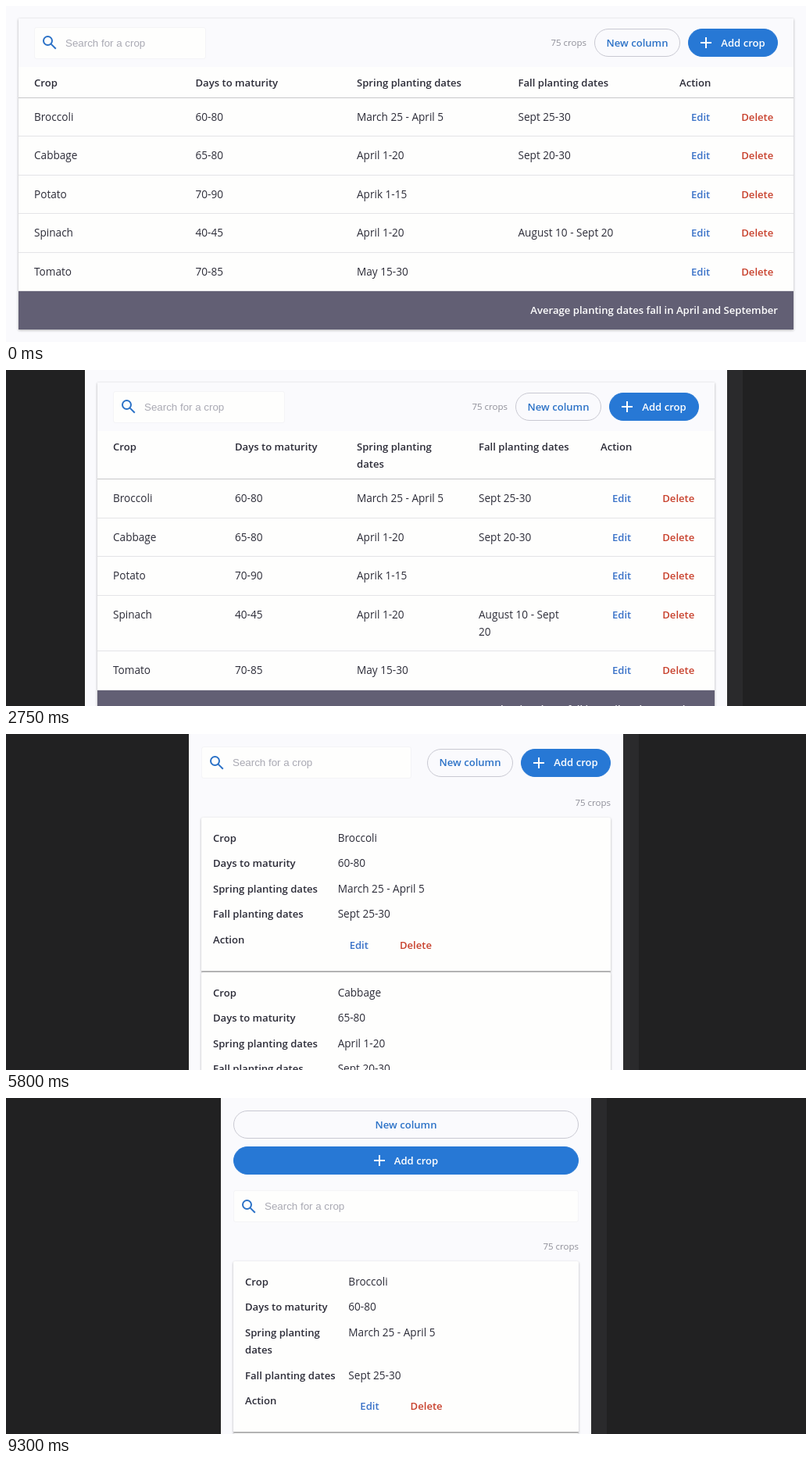
An HTML page for the animation above (9.4 s loop, 1024 by 430 pixels).

```html
<!DOCTYPE html>
<html lang="en">
<head>
<meta charset="utf-8">
<title>Responsive crop table</title>
<style>
@property --x { syntax: "<integer>"; inherits: true; initial-value: 0; }
@property --lag { syntax: "<integer>"; inherits: true; initial-value: 0; }

/* --x is the inset of the viewport on both sides while it is dragged narrower */
@keyframes drag {
  0%, 8.511% { --x: 0; }
  14.362% { --x: 20; }
  18.085% { --x: 30; }
  28.191% { --x: 96; }
  29.255% { --x: 101; }
  36.17% { --x: 164; }
  38.298% { --x: 181; }
  47.34%, 52.128% { --x: 202; }
  59.574% { --x: 229; }
  70.213% { --x: 254; }
  79.787% { --x: 274; }
  81.915%, 100% { --x: 275; }
}
/* the layout trails the viewport for a moment */
@keyframes trail {
  0%, 11.7% { --lag: 0; }
  14.362% { --lag: 10; }
  17%, 100% { --lag: 0; }
}

* { box-sizing: border-box; }
html, body {
  margin: 0;
  width: 100%;
  height: 100%;
  overflow: hidden;
  background: #212122;
}
.page {
  position: absolute;
  top: 0;
  left: calc(var(--x) * 1px);
  width: calc(1024px - var(--x) * 2px);
  height: 430px;
  overflow: hidden;
  container-type: inline-size;
  background: #fafafd;
  box-shadow: 20px 0 #2a2a2c;
  color: #2c2c38;
  font: 13.6px/22.4px "Open Sans", "Noto Sans", sans-serif;
  animation: drag 9.4s linear infinite, trail 9.4s linear infinite;
}
.app {
  width: calc(100% - 32px + var(--lag) * 1px);
  margin: 16px;
  box-shadow: 0 1px 3px rgba(0, 0, 0, .3);
}
svg { fill: none; stroke: currentColor; stroke-width: 2; flex: none; }

.bar {
  display: flex;
  align-items: center;
  gap: 0 10px;
  height: 62px;
  padding: 0 20px;
}
.search {
  display: flex;
  align-items: center;
  gap: 8px;
  width: 220px;
  height: 41px;
  padding-left: 7px;
  border: 1px solid #f4f4f7;
  border-radius: 3px;
  background: #fefefd;
  color: #a9a9b3;
  font: 13.333px "Liberation Sans", Arial, sans-serif;
}
.search svg { color: #2c72c7; }
.count { margin-left: auto; color: #8e8e98; font-size: 11.5px; }
.btn {
  display: flex;
  align-items: center;
  justify-content: center;
  gap: 12px;
  width: 110px;
  height: 36px;
  border: 1px solid #c9c9d2;
  border-radius: 18px;
  color: #2c72c7;
  white-space: nowrap;
}
.add { width: 115px; border-color: #2778d5; background: #2778d5; color: #fff; }
.btn, .head, .label, .acts, footer { font-weight: 600; font-size: 13.1px; }

.row {
  display: grid;
  grid-template-columns: repeat(4, minmax(0, 1fr)) 166px;
  padding: 13px 0;
  border-bottom: 1px solid #e4e4e7;
  background: #fefefd;
}
.head { padding: 8.6px 0 8px; border-color: #c8c8ca; }
.cell { padding: 0 16px 0 20px; }
.label { display: none; }
.acts { display: flex; gap: 10px; }
.acts span { padding: 0 15px; }
.edit { color: #3a72c8; }
.delete { color: #c8412d; }
footer {
  padding: 0 20px;
  background: #625f74;
  color: #fff;
  line-height: 49px;
  text-align: right;
  white-space: nowrap;
}

@container (max-width: 768px) {
  .app { box-shadow: none; }
  .bar { flex-wrap: wrap; height: auto; padding: 0; }
  .search { flex: 1 1 0; margin-right: 10px; }
  .count { order: 4; flex: 0 0 100%; margin: 20px 0 7.6px; text-align: right; }
  .head { display: none; }
  .row:not(.head) {
    display: block;
    padding: 15px 0;
    border-bottom: 2px solid #b8b8b9;
    border-radius: 2px;
    box-shadow: 0 1px 3px rgba(0, 0, 0, .3);
  }
  .cell { display: grid; grid-template-columns: 33.333% 1fr; padding: 0; margin-bottom: 10px; }
  .cell:last-child { margin: 0; }
  .label { display: block; padding: 0 14px 0 15px; }
  .acts { line-height: 36.4px; }
}
@container (max-width: 500px) {
  .btn, .search { flex: 0 0 100%; }
  .add { order: 1; margin-top: 10px; }
  .search { order: 2; margin: 20px 0 0; }
}
</style>
</head>
<body>
<main class="page">
  <section class="app">
    <div class="bar">
      <div class="search">
        <svg width="24" height="24"><circle cx="9.5" cy="9.5" r="5.5"/><path d="M13.6 13.6 19.8 19.8"/></svg>
        <span>Search for a crop</span>
      </div>
      <div class="count">75 crops</div>
      <div class="btn">New column</div>
      <div class="btn add"><svg width="14" height="14"><path d="M7 0V14M0 7H14"/></svg>Add crop</div>
    </div>
    <div id="table"></div>
    <footer>Average planting dates fall in April and September</footer>
  </section>
</main>
<script>
const labels = ["Crop", "Days to maturity", "Spring&nbsp;planting dates", "Fall&nbsp;planting&nbsp;dates", "Action"];
const crops = [
  ["Broccoli", "60-80", "March 25 - April 5", "Sept 25-30"],
  ["Cabbage", "65-80", "April 1-20", "Sept 20-30"],
  ["Potato", "70-90", "Aprik 1-15", ""],
  ["Spinach", "40-45", "April 1-20", "August 10 - Sept 20"],
  ["Tomato", "70-85", "May 15-30", ""]
];
const acts = '<div class="acts"><span class="edit">Edit</span><span class="delete">Delete</span></div>';
const cell = html => `<div class="cell">${html}</div>`;
const row = (cells, type = "") => `<div class="row ${type}">${cells.map(cell).join("")}</div>`;
const field = (value, i) => `<div class="label">${labels[i]}</div><div>${value}</div>`;

document.getElementById("table").innerHTML =
  row(labels, "head") + crops.map(crop => row([...crop, acts].map(field))).join("");
</script>
</body>
</html>
```
